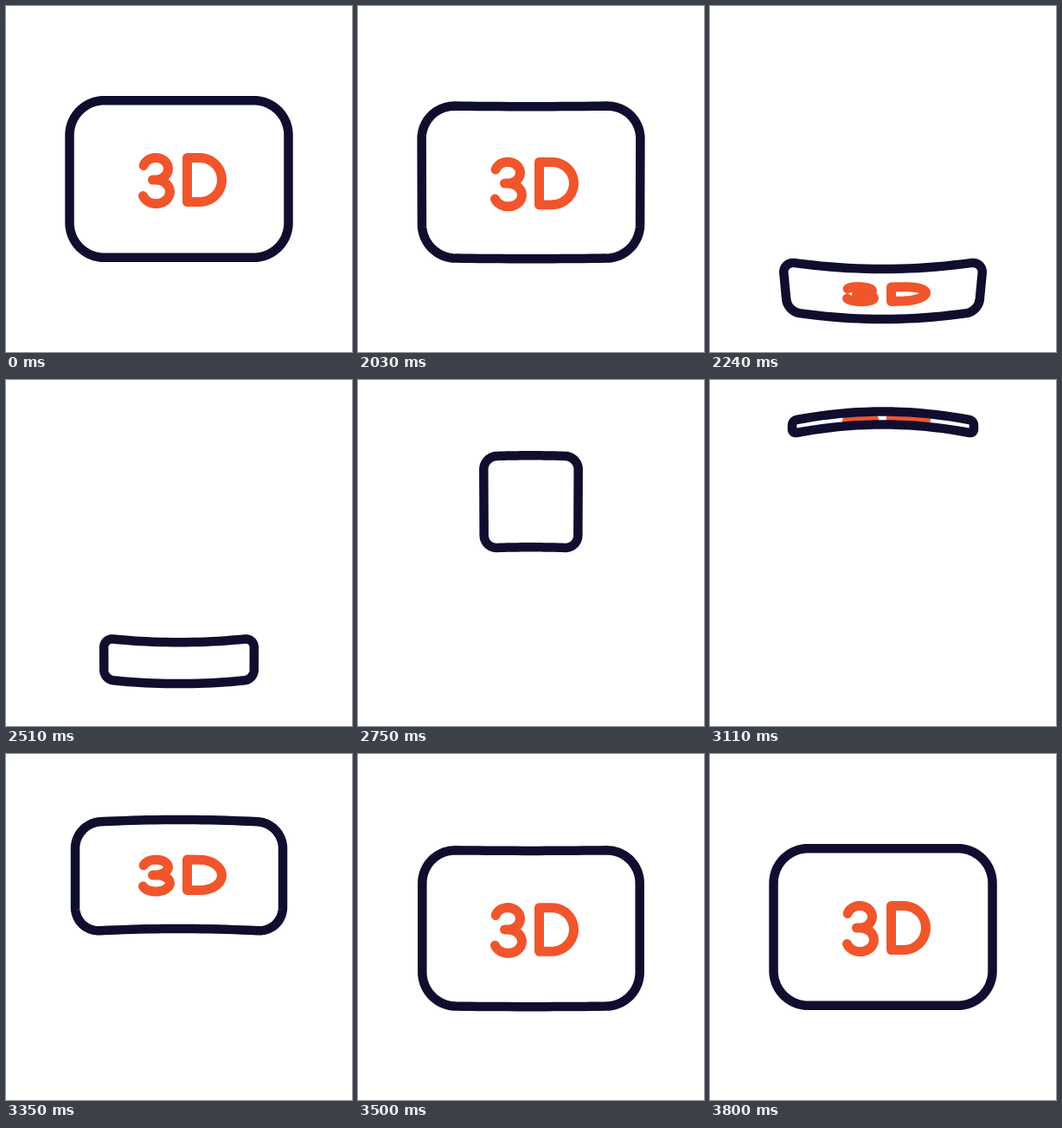
Animation, 400 px wide and 400 px high, one loop 3.86 s. Source, as an HTML page with a canvas:

```html
<!DOCTYPE html>
<html>
<head>
<meta charset="utf-8">
<title>3D panel</title>
<style>
html, body { margin: 0; width: 100%; height: 100%; overflow: hidden; background: #fff; }
canvas { display: block; width: 400px; height: 400px; }
</style>
</head>
<body>
<canvas id="stage" width="400" height="400"></canvas>
<script>
const ctx = document.getElementById('stage').getContext('2d');
const LOOP = 3860, START = 2000, STEP = 30;

// time, top y, bottom y, top width, bottom width, bulge of the edges, corner radius
const KEYS = [
  [2000, 109.2, 290.8, 253, 253, 0, 40],
  [2030, 115, 291, 253, 252, 1.2, 38.5],
  [2130, 192, 320, 259, 246, 5.5, 30],
  [2240, 295, 353, 232, 221, 9, 14],
  [2330, 346, 352.5, 216, 212, 10.5, 4],
  [2540, 285, 344, 165, 165, 4, 12],
  [2690, 137, 243, 105, 105, 0, 16],
  [2750, 88.5, 194.5, 109.5, 108.5, -1.2, 15],
  [2900, 44, 110, 165, 165, -6, 11],
  [2990, 45, 72, 194, 194, -10, 7],
  [3080, 46, 56, 207, 207, -10.5, 4],
  [3110, 47, 62, 210, 210, -10.5, 5],
  [3350, 80, 206, 240, 240, -4, 29],
  [3560, 116, 304, 253, 253, 2, 40],
  [3800, 109.2, 290.8, 253, 253, 0, 40]
];

const slope = (i, c) => (KEYS[i + 1][c] - KEYS[i][c]) / (KEYS[i + 1][0] - KEYS[i][0]);

// Monotone tangent: flat at turning points and at both ends
function tangent(i, c) {
  if (i === 0 || i === KEYS.length - 1) return 0;
  const a = slope(i - 1, c), b = slope(i, c);
  return a * b > 0 ? 2 * a * b / (a + b) : 0;
}

function poseAt(t) {
  let i = 0;
  while (i < KEYS.length - 2 && t >= KEYS[i + 1][0]) i++;
  const span = KEYS[i + 1][0] - KEYS[i][0];
  const s = Math.min(1, Math.max(0, (t - KEYS[i][0]) / span));
  const value = c =>
    KEYS[i][c] * (1 + 2 * s) * (1 - s) ** 2 +
    KEYS[i + 1][c] * s * s * (3 - 2 * s) +
    span * s * (1 - s) * (tangent(i, c) * (1 - s) - tangent(i + 1, c) * s);
  const [top, bottom, wTop, wBottom, bulge, radius] = [1, 2, 3, 4, 5, 6].map(value);
  return { top, bottom, wTop, wBottom, bulge, radius };
}

function arc(cx, cy, rx, ry, from, to, n = 20) {
  return Array.from({ length: n + 1 }, (_, i) => {
    const a = (from + (to - from) * i / n) * Math.PI / 180;
    return [cx + rx * Math.cos(a), cy + ry * Math.sin(a)];
  });
}

const THREE = [
  ...arc(173, 188.2, 14.5, 12.8, 197, 450),
  [169.5, 201], [173.5, 201],
  ...arc(173.5, 214.8, 16, 13.8, -90, 160)
];
const DEE = [[209.5, 175.5], ...arc(224, 201, 25.5, 25.5, -90, 90), [209.5, 226.5]];

function stroke(points, color, width, closed) {
  ctx.beginPath();
  points.forEach(p => ctx.lineTo(...p));
  if (closed) ctx.closePath();
  ctx.strokeStyle = color;
  ctx.lineWidth = width;
  ctx.stroke();
}

function outline({ top, bottom, wTop, wBottom, bulge, radius }) {
  const h = bottom - top, half = (wTop + wBottom) / 4;
  const r = Math.min(radius, h / 2), x = half - r;
  const edge = (y, dir) => Array.from({ length: 21 }, (_, i) => [dir * x * (i / 10 - 1), y]);
  const flat = [
    ...edge(0, 1), ...arc(x, r, r, r, -90, 0),
    ...arc(x, h - r, r, r, 0, 90), ...edge(h, -1),
    ...arc(-x, h - r, r, r, 90, 180), ...arc(-x, r, r, r, 180, 270)
  ];
  return flat.map(([px, py]) => {
    const u = px / half, w = wTop + (wBottom - wTop) * py / h;
    return [200 + u * w / 2, top + py + bulge * (1 - u * u)];
  });
}

function draw(t) {
  const time = t < START ? START : START + Math.floor((t - START) / STEP) * STEP;
  const pose = poseAt(time);
  ctx.fillStyle = '#fff';
  ctx.fillRect(0, 0, 400, 400);
  ctx.lineCap = ctx.lineJoin = 'round';

  // Letters keep their width and line weight; only their height follows the panel
  if (time < 2330 || time >= 3080) {
    const { top, bottom, wTop, bulge } = pose;
    const place = ([x, y]) => [x,
      top + (y - 109.2) / 181.6 * (bottom - top) + bulge * (1 - (2 * (x - 200) / wTop) ** 2)];
    stroke(THREE.map(place), '#f1552b', 11);
    stroke(DEE.map(place), '#f1552b', 11, true);
  }
  stroke(outline(pose), '#100e2e', 10.5, true);
}

const begin = performance.now();
function tick() {
  draw((performance.now() - begin) % LOOP);
  requestAnimationFrame(tick);
}
tick();
</script>
</body>
</html>
```
